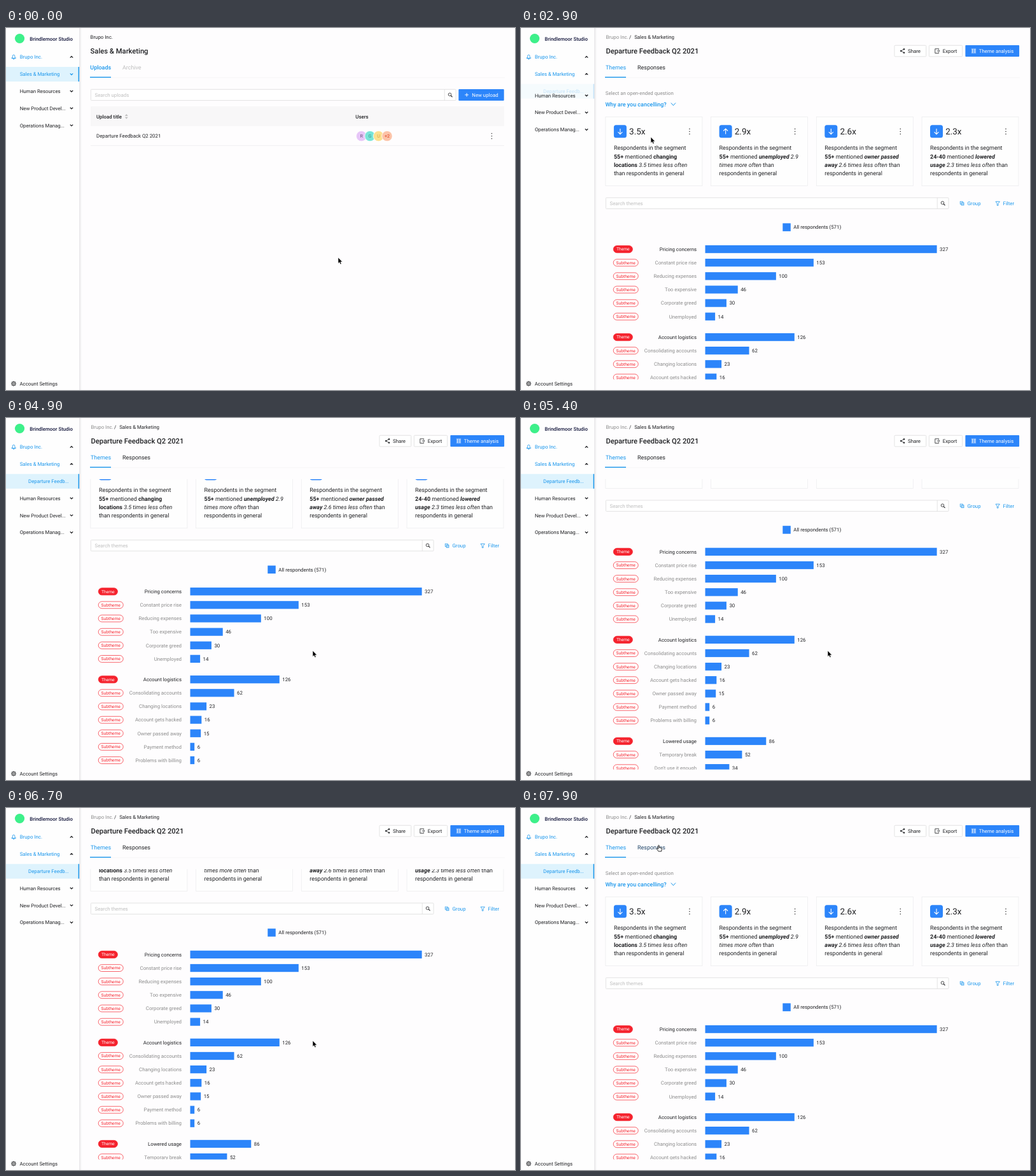
Recreate the animation shown at these times as an HTML page. Size 800 px wide and 568 px high, loop 8 s.

```html
<!DOCTYPE html>
<html lang="en">
<head>
<meta charset="utf-8">
<title>Survey dashboard</title>
<style>
  html, body { margin: 0; width: 100%; height: 100%; overflow: hidden; background: #fefdfe; }
  svg { display: block; width: 800px; height: 568px; font-family: Roboto, "Open Sans", sans-serif; text-rendering: geometricPrecision; }
</style>
</head>
<body>
<svg id="stage" viewBox="0 0 800 568" xmlns="http://www.w3.org/2000/svg"></svg>
<script>
const LINK = '#1b97ec', FILL = '#2c85fa', INK = '#202124', GREY = '#8c8c8c', PALE = '#bfbfbf', EDGE = '#d9d9d9', RED = '#f5222d';
const BASE = 7.84, MID = 8.96;
const COMPANY = 'Brupo Inc.', SURVEY = 'Departure Feedback Q2 2021';

// Text is placed by its vertical centre.
const text = (x, cy, str, { size = BASE, fill = INK, weight = 400, anchor = 'start', id = '' } = {}) =>
  `<text ${id && `id="${id}"`} x="${x}" y="${(cy + size * 0.355).toFixed(2)}" font-size="${size}" fill="${fill}" font-weight="${weight}" text-anchor="${anchor}">${str}</text>`;
const rect = (x, y, w, h, fill, stroke = 'none', r = 0) =>
  `<rect x="${x}" y="${y}" width="${w}" height="${h}" rx="${r}" fill="${fill}" stroke="${stroke}" stroke-width=".7"/>`;
const line = (d, stroke = INK, width = 0.9) =>
  `<path d="${d}" fill="none" stroke="${stroke}" stroke-width="${width}"/>`;
const circle = (x, y, r, fill, stroke = 'none') =>
  `<circle cx="${x}" cy="${y}" r="${r}" fill="${fill}" stroke="${stroke}" stroke-width=".8"/>`;
const group = (id, body, attrs = '') => `<g id="${id}" ${attrs}>${body}</g>`;

const chevron = (x, y, up, color = INK) => {
  const s = up ? -1 : 1;
  return line(`M${x - 2.2} ${y - s}l2.2 ${2.1 * s}l2.2 ${-2.1 * s}`, color, 1.3);
};
const dots = (x, y, gap) => [-gap, 0, gap].map(d => circle(x, y + d, 0.85, '#555')).join('');
const lens = (x, y) => circle(x - 0.6, y - 0.6, 2.3, 'none', INK) + line(`M${x + 1.1} ${y + 1.1}l2.3 2.3`, INK, 1.1);
const tabLine = rect(132, 77.6, 651.5, 0.7, '#f0f0f0') + rect(132, 76.6, 33, 1.4, LINK);

function searchBox(y, right, split, hint) {
  return rect(133.4, y, right - 133.4, 17.3, '#fff', EDGE, 1) +
    line(`M${split} ${y}v17.3`, EDGE, 0.7) +
    text(139.5, y + 8.7, hint, { fill: PALE }) + lens((split + right) / 2, y + 8.6);
}

function sidebar() {
  const item = (y, label) => text(21.7, y, label) + chevron(103, y - 0.2, false);
  let gear = circle(12, 558, 1.4, 'none', INK) + circle(12, 558, 3, 'none', INK);
  for (let a = 0; a < 8; a++)
    gear += `<path d="M12 554.1v1" stroke="${INK}" stroke-width="1.2" transform="rotate(${a * 45} 12 558)"/>`;
  return rect(0, 0, 115.5, 568, '#fefefe') +
    rect(115.2, 0, 1.6, 568, '#e6e5e8') + rect(116.8, 0, 1.6, 568, '#f5f4f6') +
    circle(21.5, 16.5, 7.6, '#3df08a') +
    text(37.3, 17, 'Brindlemoor Studio', { weight: 500, fill: '#15183d' }) +
    line('M10.3 47.6v-3.2q0-2.3 1.8-2.3t1.8 2.3v3.2zM9 46.2v1.5h6.2v-1.5M12.1 47.7v2.3', LINK, 0.8) +
    text(21.7, 45.6, COMPANY, { fill: LINK }) + chevron(103, 45.6, true) +
    group('salesOn', rect(0, 61, 115, 23, '#def3fd') + rect(113.6, 61, 1.5, 23, LINK) + chevron(103, 72.4, false, LINK)) +
    group('salesOpen', chevron(103, 72.4, true)) +
    text(21.7, 72.5, 'Sales &amp; Marketing', { fill: LINK }) +
    group('child', rect(0, 87.8, 115, 23, '#def3fd') + rect(113.6, 87.8, 1.5, 23, LINK) +
      text(35, 99.2, 'Departure Feedb...', { fill: LINK })) +
    group('lower', item(99.2, 'Human Resources') + item(126, 'New Product Devel...') + item(152.8, 'Operations Manag...')) +
    gear + text(21.5, 558, 'Account Settings');
}

function listPage() {
  const people = [['R', '#e7c6f8', '#66507a'], ['G', '#78e5d8', '#3b8f88'], ['U', '#fde08f', '#d3a347'], ['+2', '#fcc3a8', '#e03c1c']];
  return text(132.6, 14.2, COMPANY) +
    text(132.6, 35.6, 'Sales &amp; Marketing', { size: 11.2, weight: 500 }) +
    tabLine +
    text(132.3, 62.2, 'Uploads', { size: MID, weight: 500, fill: LINK }) +
    text(183, 62.2, 'Archive', { size: MID, fill: PALE }) +
    searchBox(96.3, 707, 689.2, 'Search uploads') +
    rect(711.3, 95.9, 71.4, 18, FILL, 'none', 1) +
    line('M721.2 104.9h5.8M724.1 102v5.8', '#fff') +
    text(732.3, 104.9, 'New upload', { fill: '#fff' }) +
    rect(133, 123, 650, 31, '#f8f7f8') +
    text(142, 138.8, 'Upload title', { weight: 500 }) +
    `<path d="M186.8 138l2.5-3 2.5 3zM186.8 139.7l2.5 3 2.5-3z" fill="${PALE}"/>` +
    text(549.3, 138.8, 'Users', { weight: 500 }) +
    text(142, 169.3, SURVEY) +
    people.map(([name, bg, fg], i) => circle(558.6 + i * 13.45, 169.6, 8.2, bg, '#fff') +
      text(558.6 + i * 13.45, 169.8, name, { size: 7.2, fill: fg, anchor: 'middle' })).join('') +
    dots(763.4, 169.5, 4) + rect(133, 184, 650, 0.7, '#eeedef');
}

const cards = [
  ['3.5x', false, '<b>55+</b> mentioned <b>changing</b>', '<b>locations</b> <i>3.5 times less often</i>', 'than respondents in general'],
  ['2.9x', true, '<b>55+</b> mentioned <u>unemployed</u> <i>2.9</i>', '<i>times more often</i> than', 'respondents in general'],
  ['2.6x', false, '<b>55+</b> mentioned <u>owner passed</u>', '<u>away</u> <i>2.6 times less often</i> than', 'respondents in general'],
  ['2.3x', false, '<b>24-40</b> mentioned <u>lowered</u>', '<u>usage</u> <i>2.3 times less often</i> than', 'respondents in general']
];
// b = bold, i = italic, u = both
const spans = { b: 'font-weight="700"', i: 'font-style="italic"', u: 'font-weight="700" font-style="italic"' };
const rich = s => s.replace(/<([biu])>/g, (m, k) => `<tspan ${spans[k]}>`).replace(/<\/[biu]>/g, '</tspan>');

function card([value, up, ...lines], i) {
  const x = 132.9 + i * 165.7, s = up ? -1 : 1;
  return rect(x, 139.3, 152, 108.4, '#fefefe', '#ebebed') +
    rect(x + 13, 152.3, 20, 20, FILL, 'none', 3.5) +
    line(`M${x + 23} ${162.3 - 4.3 * s}v${8.6 * s}m-3.5 ${-3.5 * s}l3.5 ${3.5 * s}l3.5 ${-3.5 * s}`, '#fff', 1.1) +
    text(x + 37.2, 162.5, value, { size: 13.44 }) + dots(x + 132, 162.3, 4) +
    ['Respondents in the segment', ...lines].map((l, n) =>
      text(x + 13, 188 + n * 13.35, rich(l), { size: MID })).join('');
}

const themes = [
  [['Pricing concerns', 327], ['Constant price rise', 153], ['Reducing expenses', 100], ['Too expensive', 46], ['Corporate greed', 30], ['Unemployed', 14]],
  [['Account logistics', 126], ['Consolidating accounts', 62], ['Changing locations', 23], ['Account gets hacked', 16], ['Owner passed away', 15], ['Payment method', 6], ['Problems with billing', 6]],
  [['Lowered usage', 86], ['Temporary break', 52], ['Don\'t use it enough', 34]],
  [['Prefer competition', 17]]
];

function chart() {
  let y = 347.1, out = '';
  for (const rows of themes) {
    rows.forEach(([label, n], i) => {
      const w = n * 1.1135, main = i === 0;
      out += (main ? rect(145.2, y - 5.6, 30.2, 11.2, RED, RED, 5.6) : rect(145.2, y - 5.4, 39, 10.8, '#fff', RED, 5.4)) +
        text(main ? 160.3 : 164.7, y, main ? 'Theme' : 'Subtheme', { size: 6.72, fill: main ? '#fff' : RED, anchor: 'middle' }) +
        text(276, y, label, { fill: main ? INK : GREY, anchor: 'end' }) +
        rect(289.5, y - 6.2, w, 12.3, FILL) + text(289.5 + w + 4.5, y, n);
      y += 21.13;
    });
    y += 11.2;
  }
  out += rect(289.5, 738, 494, 0.6, '#ececee');
  [291.5, 401.5, 515.7, 630, 744].forEach((x, i) => out += text(x, 745.5, i * 100, { anchor: 'middle' }));
  return out;
}

function surveyPage() {
  const head = text(133.4, 14.2, COMPANY, { fill: GREY }) + text(170, 14.2, '/') + text(178.2, 14.2, 'Sales &amp; Marketing') +
    text(133.4, 35.6, SURVEY, { size: 11.2, weight: 500 }) + tabLine +
    text(133, 62.2, 'Themes', { size: MID, fill: LINK }) +
    text(183, 62.2, 'Responses', { size: MID, id: 'responses' }) +
    rect(587, 27.3, 49.7, 17.5, '#fff', EDGE, 1) + line('M602 33.2l-4.8 2.8l4.8 2.8', INK, 0.8) +
    [[602, 33.2], [597.2, 36], [602, 38.8]].map(p => circle(...p, 1.2, INK)).join('') + text(608, 36, 'Share') +
    rect(641.4, 27.3, 52.2, 17.5, '#fff', EDGE, 1) +
    line('M656.6 34v-1.3h-5.8v6.8h5.8v-1.3M653.6 36h4.2m-1.4-1.4l1.4 1.4l-1.4 1.4', INK, 0.8) + text(662.7, 36, 'Export') +
    rect(698.4, 27, 84.7, 18, FILL, 'none', 1) +
    line('M707.8 33h7.4M707.8 39h7.4M708 34.9h7.2M708 37h7.2M709.6 33v6M713.3 33v6', '#fff', 0.7) +
    text(719.8, 36, 'Theme analysis', { fill: '#fff' });
  const body = text(132.8, 102, 'Select an open-ended question', { fill: GREY }) +
    text(132.4, 119.5, 'Why are you cancelling?', { size: MID, weight: 500, fill: LINK }) +
    line('M235.8 117.5l3.6 4.1l3.6-4.1', LINK, 1) +
    cards.map(card).join('') + searchBox(266.3, 672, 654.2, 'Search themes') +
    rect(690.2, 272.2, 4, 4, 'none', LINK) + rect(692, 274, 4, 4, '#b5dcfa', LINK) + text(701.5, 275.2, 'Group', { fill: LINK }) +
    line('M746 272.3h6.4l-2.3 3.1v3h-1.8v-3z', LINK, 0.8) + text(757.6, 275.2, 'Filter', { fill: LINK }) +
    rect(411.3, 306.4, 12.5, 12.5, FILL) + text(428.3, 312.7, 'All respondents (571)') + chart();
  return head + `<g clip-path="url(#view)">${group('scroll', body)}</g>`;
}

const cursor =
  group('arrow', '<path d="M0 0v9.5l2.1-1.9 1.4 3.2 1.7-.8-1.4-3h2.9z" fill="#000" stroke="#fff" stroke-width=".6"/>') +
  group('hand', '<path d="M-.3.8q.9-1.1 1.6.1v3.2l2.6.5q1.5.3 1.4 1.8l-.6 3.6h-4.6l-2.8-3.8q-.2-1.3 1.1-.8l1.3 1z" fill="#fff" stroke="#111" stroke-width=".9"/>');

const $ = id => document.getElementById(id);
$('stage').innerHTML = '<clipPath id="view"><rect x="118" y="96" width="682" height="455.5"/></clipPath>' +
  sidebar() + group('list', listPage()) + group('survey', surveyPage()) + group('cursor', cursor);

const linear = p => p, smooth = p => p * p * (3 - 2 * p), easeIn = p => p * p, easeOut = p => 1 - (1 - p) * (1 - p);
// [time, values, easing towards the row]
const moves = [
  [0, [522, 360]], [600, [522, 360]], [1500, [210, 184], smooth], [2000, [204, 171], easeOut],
  [3400, [204, 171]], [3900, [250, 239], easeIn], [4300, [482, 365], easeOut],
  [7200, [482, 365]], [7900, [216, 58], smooth]
];
const scrolls = [[0, [0]], [4300, [0]], [5400, [137.2]], [6000, [214.8]], [6300, [214.8]], [7000, [43.9]], [7200, [0], easeOut]];

function at(table, t) {
  const i = table.findIndex(row => row[0] > t);
  if (i < 0) return table[table.length - 1][1];
  const [t0, a] = table[i - 1], [t1, b, ease = linear] = table[i];
  const p = ease((t - t0) / (t1 - t0));
  return a.map((v, k) => v + (b[k] - v) * p);
}

const LOOP = 8000, STEP = 100, OPEN = 2900;
const show = (id, on) => $(id).setAttribute('visibility', on ? 'visible' : 'hidden');

function draw(now) {
  const t = Math.floor((now % LOOP) / STEP) * STEP;
  const open = t >= OPEN;
  const grow = Math.min(1, Math.max(0, (t - OPEN + STEP) / 400));
  const [x, y] = at(moves, t);
  const hover = open && y < 70 && x > 183 && x < 227;
  show('list', !open);
  show('survey', open);
  show('salesOn', !open);
  show('salesOpen', open);
  $('child').setAttribute('opacity', open ? grow : 0);
  $('lower').setAttribute('transform', `translate(0 ${open ? 26.8 * grow : 0})`);
  $('scroll').setAttribute('transform', `translate(0 ${-at(scrolls, t)[0]})`);
  $('cursor').setAttribute('transform', `translate(${x} ${y})`);
  show('arrow', !hover);
  show('hand', hover);
  $('responses').setAttribute('fill', hover ? '#1f4468' : INK);
}

const start = performance.now();
function tick() {
  draw(performance.now() - start);
  requestAnimationFrame(tick);
}
tick();
</script>
</body>
</html>
```
